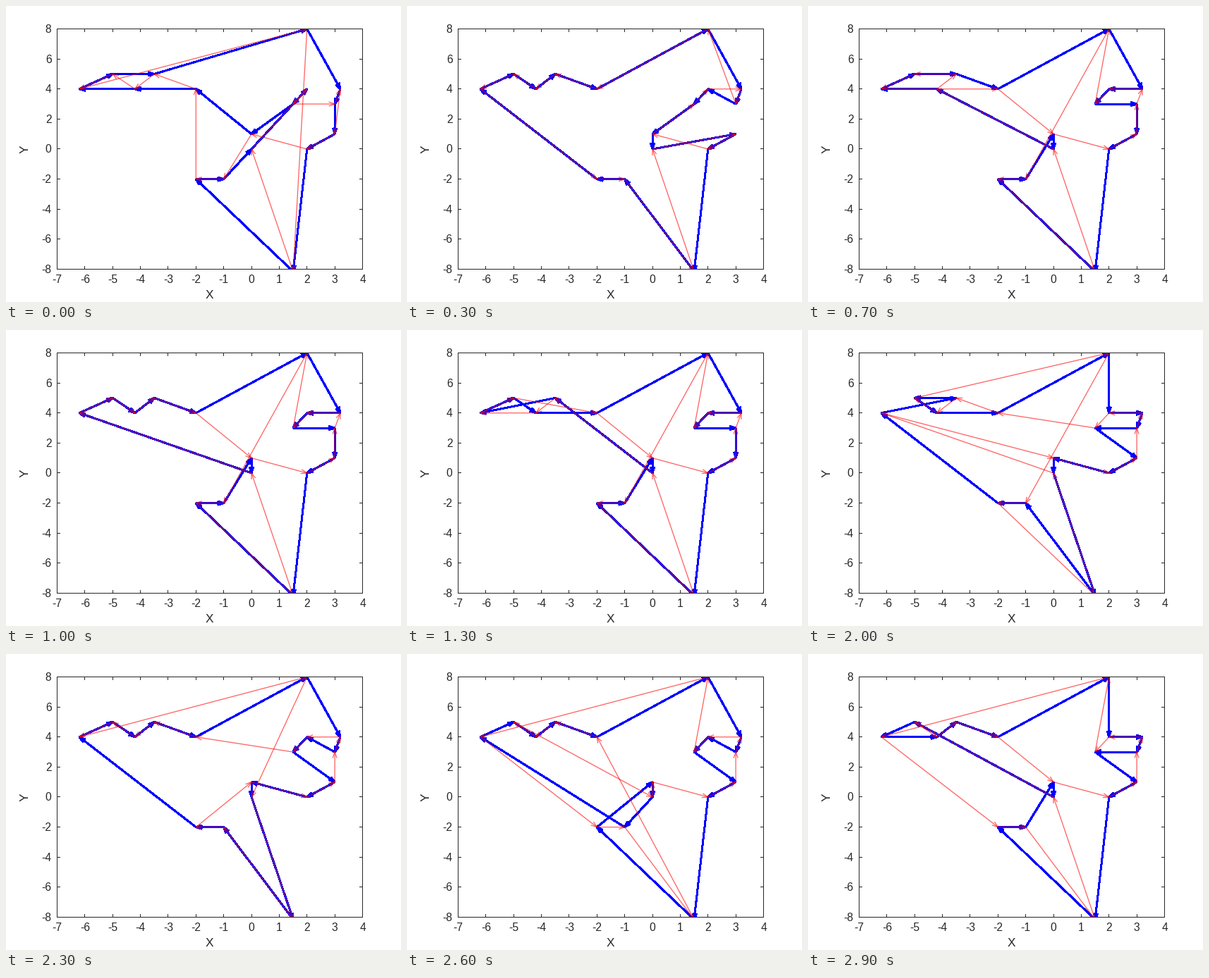
Write a matplotlib script that moves like this. It is 560x420 px and loops after 3 s.

```python
import numpy as np
import matplotlib.pyplot as plt
from matplotlib.animation import FuncAnimation
from matplotlib.collections import LineCollection
from matplotlib.patches import Rectangle

W, H, DPI = 560, 420, 100
FRAMES, INTERVAL = 30, 100
LEFT, RIGHT, TOP, BOTTOM = 72.5, 505.5, 32.5, 373.5
INK = "#262626"
PX = 72 / DPI  # points per pixel
TICK_FONT, LABEL_FONT = 15.6, 17.2

CITIES = {
    "A": (-6.2, 4), "B": (-5, 5), "C": (-4.2, 4), "D": (-3.5, 5),
    "E": (-2, 4), "F": (-2, -2), "G": (-1, -2), "H": (0, 0),
    "I": (0, 1), "J": (1.5, -8.15), "K": (2, 0), "L": (1.5, 3),
    "M": (2, 4), "N": (3, 1), "O": (3, 3), "P": (3.2, 4), "Q": (2, 8),
}

# step: (blue tour, red tour)
TOURS = {
    0: ("ABDQPONKJFGHMLIEC", "AQJHMLOPNKIGFEDCB"),
    3: ("KJGFABCDEQPOMLIHN", "KILMPOQEDCBAFGJHN"),
    7: ("KJFGIHCABDEQPMLON", "JHCDBAEIKNOPMLQGF"),
    10: ("KJFGIHABCDEQPMLON", "JHABCDEIKNOPMLQGF"),
    17: ("KJFGIHDBACEQMPOLN", "JHDCBAEIKNOPMLQGF"),
    23: ("ABCDEQPOMLNKIHJGF", "EDCBAQHJGFIKNOPML"),
    29: ("KJFGIHBACDEQMPOLN", "JHBCDEIKNOPMLQAFG"),
}


def px(x):
    return LEFT + (x + 7) * (RIGHT - LEFT) / 11


def py(y):
    return BOTTOM - (y + 8) * (BOTTOM - TOP) / 16


def from_k(tour):
    i = tour.index("K")
    return tour[i:] + tour[:i]


def chain(a, b):
    """Distinct tours met while cities of a move one by one into b's order."""
    steps = [a]
    for m in range(1, len(b) + 1):
        tour = b[:m] + "".join(c for c in a if c not in b[:m])
        if tour != steps[-1]:
            steps.append(tour)
    return steps


def build_schedule():
    keys = sorted(TOURS)
    schedule = []
    for k, nxt in zip(keys, keys[1:] + [FRAMES]):
        n = nxt - k
        blue, red = (chain(from_k(a), from_k(b))
                     for a, b in zip(TOURS[k], TOURS[nxt % FRAMES]))
        for j in range(n):
            up = -(-(len(red) - 1) * j // n)
            schedule.append((blue[(len(blue) - 1) * j // n], red[up]))
    return schedule


def arrows(tour, length, half):
    """Shafts and two-stroke heads along a closed tour."""
    pts = [np.array((px(x), py(y))) for x, y in (CITIES[c] for c in tour)]
    segs = []
    for p, q in zip(pts, pts[1:] + pts[:1]):
        d = (q - p) / np.hypot(*(q - p))
        side = np.array((-d[1], d[0])) * half
        back = q - d * length
        segs += [(p, q), (back + side, q), (back - side, q)]
    return segs


fig = plt.figure(figsize=(W / DPI, H / DPI), dpi=DPI, facecolor="white")
ax = fig.add_axes([0, 0, 1, 1])
ax.set_xlim(0, W)
ax.set_ylim(H, 0)
ax.axis("off")


def label(x, y, text, size, **kw):
    ax.text(x, y, text, fontsize=size * PX, color=INK,
            family="Liberation Sans", **kw)


def draw_axes():
    ticks = []
    for x in range(-7, 5):
        u = round(px(x) - 0.5) + 0.5
        ticks += [[(u, BOTTOM), (u, BOTTOM - 4.5)], [(u, TOP), (u, TOP + 4.5)]]
        label(px(x), 392.7, str(x), TICK_FONT, ha="center", va="baseline")
    for y in range(-8, 9, 2):
        v = round(py(y) - 0.5) + 0.5
        ticks += [[(LEFT, v), (LEFT + 4.5, v)], [(RIGHT, v), (RIGHT - 4.5, v)]]
        label(64.5, py(y) + 5.4, str(y), TICK_FONT, ha="right", va="baseline")
    ax.add_collection(LineCollection(ticks, colors=INK, linewidths=PX,
                                     zorder=4, snap=False))
    ax.add_patch(Rectangle((LEFT, TOP), RIGHT - LEFT, BOTTOM - TOP, fill=False,
                           ec=INK, lw=PX, zorder=4, snap=False))
    label(288.5, 414.7, "X", LABEL_FONT, ha="center", va="baseline")
    label(35, 203.5, "Y", LABEL_FONT, rotation=90, ha="right", va="center")


def line_layer(color, width, alpha, z, smooth):
    layer = LineCollection([], colors=color, linewidths=width * PX, alpha=alpha,
                           zorder=z, antialiaseds=smooth, snap=False)
    ax.add_collection(layer, autolim=False)
    layer.set_clip_path(Rectangle((LEFT, TOP - 0.5), RIGHT - LEFT,
                                  BOTTOM - TOP + 1, transform=ax.transData))
    return layer


draw_axes()
blue_layer = line_layer("#0000ff", 2, 1, 2, False)
red_layer = line_layer("#ff0000", 1.33, 0.6, 3, True)
schedule = build_schedule()


def update(i):
    blue, red = schedule[i % FRAMES]
    blue_layer.set_segments(arrows(blue, 8.5, 2.5))
    red_layer.set_segments(arrows(red, 8.5, 3))
    return blue_layer, red_layer


anim = FuncAnimation(fig, update, frames=FRAMES, interval=INTERVAL,
                     repeat=True, repeat_delay=0, blit=False)
plt.show()
```
